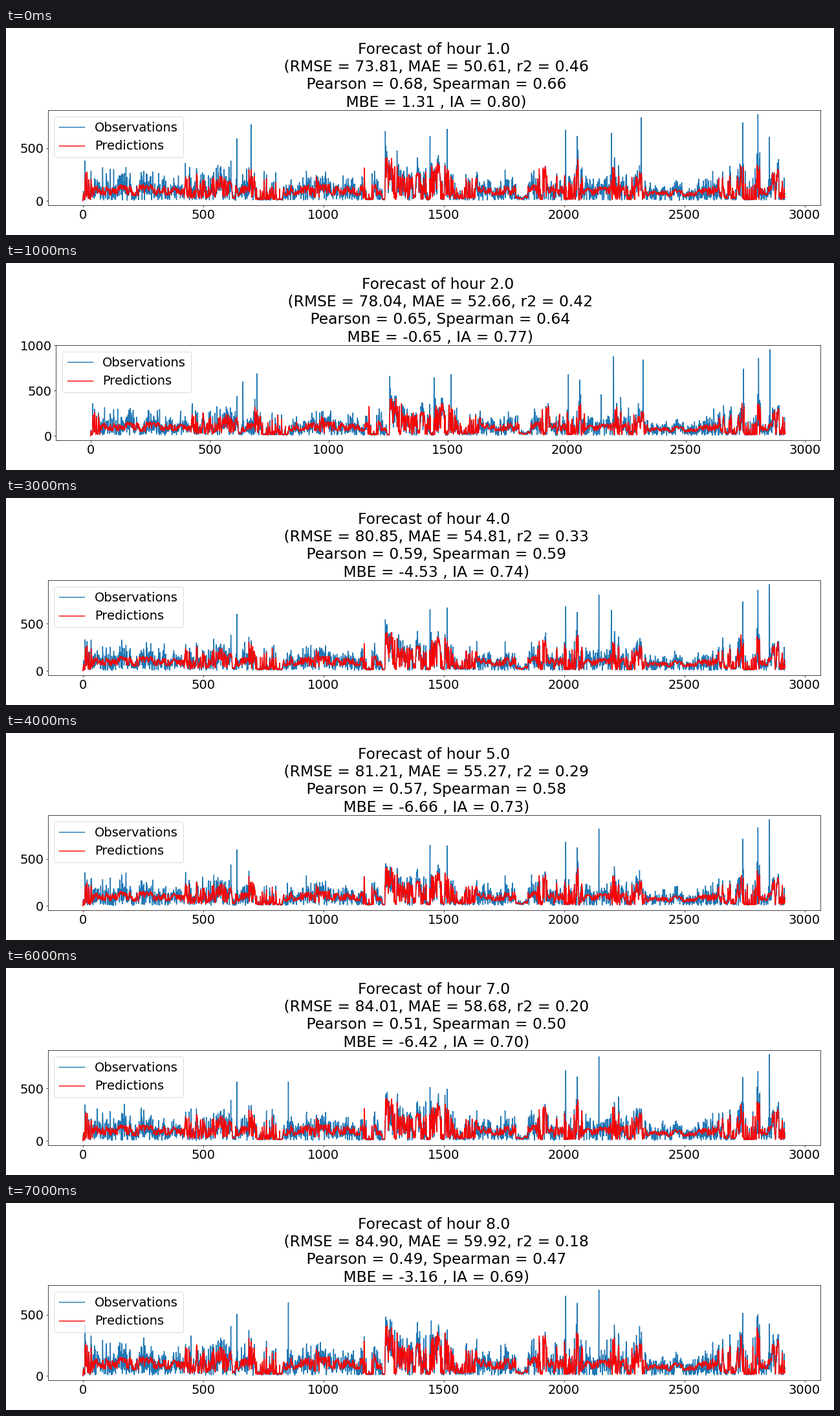
These frames come from a looping animation (1280 px wide and 320 px high, 8 s). A matplotlib script:

```python
import numpy as np
import matplotlib.pyplot as plt
from matplotlib.animation import FuncAnimation
from matplotlib.ticker import MultipleLocator

W, H, DPI = 1280, 320, 64
N = 2919
HOURS = 8

plt.rcParams.update({"font.family": "DejaVu Sans", "font.size": 22})

# scores printed in the title at the key hours; the rest lie in between
KEY_HOURS = (1, 2, 3, 5, 7, 8)
SCORES = {
    "RMSE": (73.81, 78.04, 80.50, 81.21, 84.01, 84.90),
    "MAE": (50.61, 52.66, 54.34, 55.27, 58.68, 59.92),
    "r2": (0.46, 0.42, 0.38, 0.29, 0.20, 0.18),
    "Pearson": (0.68, 0.65, 0.62, 0.57, 0.51, 0.49),
    "Spearman": (0.66, 0.64, 0.61, 0.58, 0.50, 0.47),
    "MBE": (1.31, -0.65, -2.39, -6.66, -6.42, -3.16),
    "IA": (0.80, 0.77, 0.75, 0.73, 0.70, 0.69),
}
TOPS = (819, 955, 908, 919, 825, 708)

# stretches that are livelier or calmer than usual: start, end, change
ZONES = [
    (0, 40, 150), (420, 640, 90), (690, 830, 200), (960, 985, 80),
    (1165, 1210, 230), (1245, 1310, 270), (1310, 1420, 120),
    (1425, 1525, 230), (1525, 1640, 100), (1800, 1850, -110),
    (1890, 1930, 210), (1955, 1975, 140), (2000, 2080, 320),
    (2080, 2190, -40), (2195, 2235, 210), (2260, 2335, 130),
    (2340, 2600, -45), (2640, 2735, 90), (2735, 2815, 340),
    (2865, 2919, 150),
]

# tall spikes: position, height, hour of the highest point, spread in hours
SPIKES = [
    (640, 600, 3.5, 7), (699, 725, 0, 4.2), (854, 600, 8, 2),
    (1257, 660, 1, 4.5), (1443, 650, 3.5, 5), (1514, 680, 1, 8),
    (2007, 680, 4, 9), (2055, 620, 4, 9), (2145, 820, 5.5, 4),
    (2197, 880, 2.5, 2), (2321, 840, 2, 2), (2743, 740, 1, 9),
    (2806, 860, 2, 7), (2854, 1100, 4.3, 3.75),
]

steps = np.arange(N)
rng = np.random.default_rng(12)


def drift(keep):
    """Correlated noise of unit variance."""
    kernel = keep ** np.arange(80)
    noise = rng.normal(size=N + 79)
    return np.convolve(noise, kernel / np.linalg.norm(kernel), "valid")


high = 150 + 12 * drift(0.97)
for start, end, change in ZONES:
    high[start:end] += change
low = np.maximum(12, np.minimum(0.42 * high, 95 - 0.3 * high))
skew = np.clip(high / 150, 1, 2.6)

# a daily cycle of eight steps on top of slower weather
wave = 0.75 * drift(0.88) + 0.5 * np.sin(2 * np.pi * steps / 8)
wave += 0.35 * rng.normal(size=N)
scatter = rng.normal(size=N)
gust = 1 + 0.9 * rng.random(N) * (rng.random(N) < 0.04)


def series(hour, top):
    """Return observations and predictions for one forecast hour."""
    rng = np.random.default_rng(100 + hour)
    u = 0.5 + 0.5 * np.tanh(0.85 * (wave + 0.15 * rng.normal(size=N)))
    pred = low + (high - low) * u ** skew
    pred[:8] *= np.linspace(0, 1, 8)

    mix = 0.85 * scatter + 0.5 * rng.normal(size=N)
    obs = gust * pred + 0.5 * np.minimum(pred, 130) * mix
    obs = np.clip(obs, rng.uniform(5, 14, N), 0.75 * top)
    for x, height, peak, spread in SPIKES:
        spike = height * np.exp(-((hour - peak) / spread) ** 4)
        obs[x] = min(top, max(obs[x], spike))
    return obs, pred


def heading(hour):
    s = {name: np.interp(hour, KEY_HOURS, v) for name, v in SCORES.items()}
    return (
        f"Forecast of hour {hour:.1f}\n"
        f" (RMSE = {s['RMSE']:.2f}, MAE = {s['MAE']:.2f}, "
        f"r2 = {s['r2']:.2f}\n"
        f" Pearson = {s['Pearson']:.2f}, Spearman = {s['Spearman']:.2f}\n"
        f" MBE = {s['MBE']:.2f} , IA = {s['IA']:.2f})"
    )


fig, ax = plt.subplots(figsize=(W / DPI, H / DPI), dpi=DPI)
obs_line, = ax.plot([], [], color="tab:blue", lw=1.6, label="Observations")
pred_line, = ax.plot([], [], color="red", lw=1.6, label="Predictions")
ax.legend(loc="upper left")
ax.set_xlim(-0.05 * N, 1.05 * N)
ax.xaxis.set_major_locator(MultipleLocator(500))
ax.yaxis.set_major_locator(MultipleLocator(500))


def update(i):
    hour = i + 1
    top = np.interp(hour, KEY_HOURS, TOPS)
    obs, pred = series(hour, top)
    obs_line.set_data(steps, obs)
    pred_line.set_data(steps, pred)
    ax.set_ylim(-0.05 * top, 1.05 * top)
    # four-digit tick labels need a wider left margin
    left = 77 if 1.05 * top >= 1000 else 64.6
    ax.set_position([left / W, 46 / H, (1258.7 - left) / W, 147 / H])
    ax.set_title(heading(hour), y=1.0, linespacing=1.235)
    return obs_line, pred_line


anim = FuncAnimation(fig, update, frames=HOURS, interval=1000,
                     repeat=True, repeat_delay=0, blit=False)
plt.show()
```
